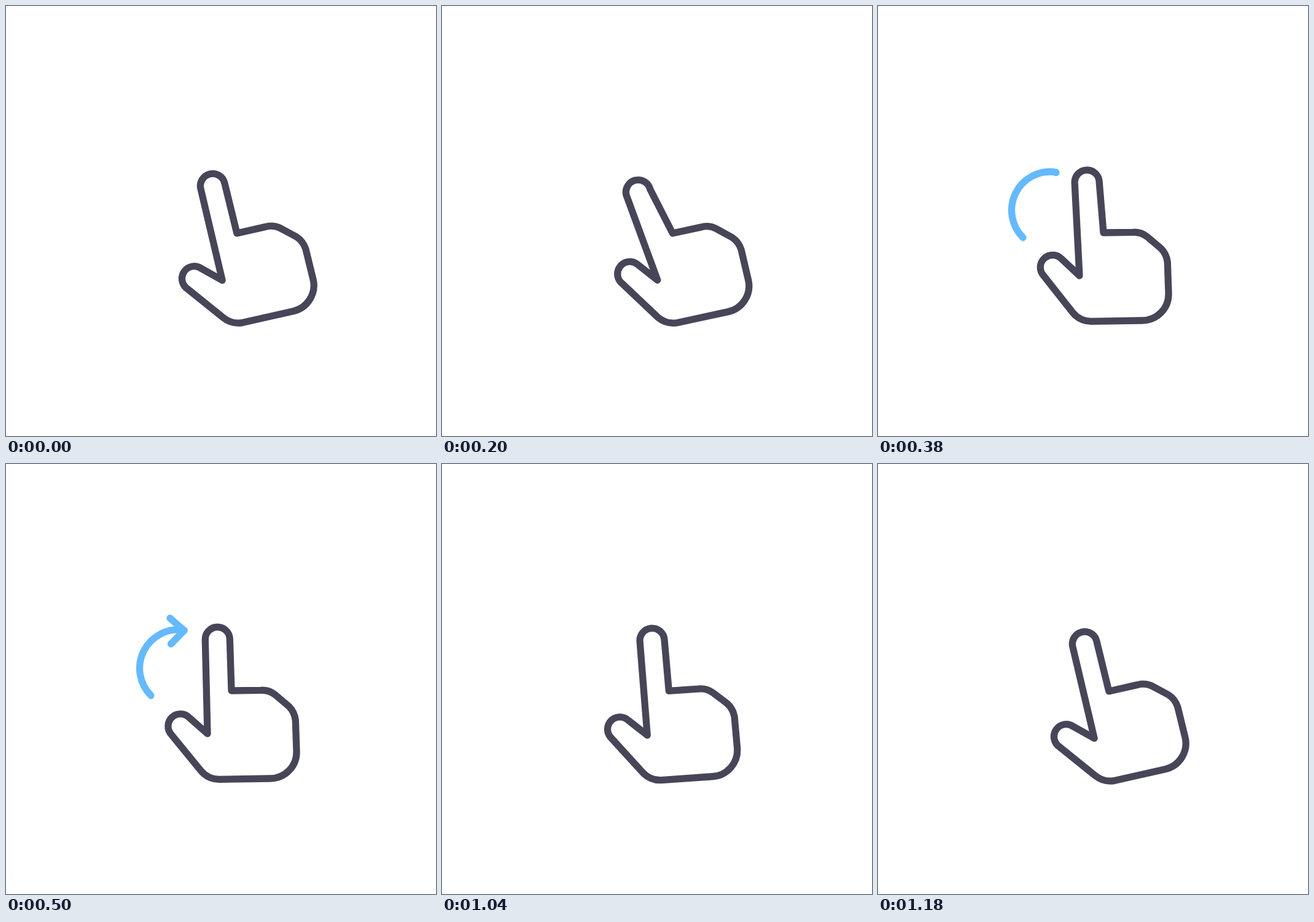
An HTML page for the animation above (1200 ms loop, 700 by 700 pixels).

```html
<!DOCTYPE html>
<html>
<head>
<meta charset="utf-8">
<style>
html, body { margin: 0; height: 100%; overflow: hidden; background: #fff; }
svg { display: block; width: 100vw; height: 100vh; }
path { fill: none; stroke-width: 11.3; stroke-linecap: round; stroke-linejoin: round; }
#hand { stroke: #474658; }
#arc, #head { stroke: #64b9ff; }
</style>
</head>
<body>
<svg viewBox="0 0 700 700">
  <path id="arc" pathLength="1" d="M236 377A62.8 62.8 0 0 1 290 270.5"/>
  <path id="head"/>
  <path id="hand"/>
</svg>
<script>
const LOOP = 1200;
const [arc, head, hand] = ['arc', 'head', 'hand'].map(id => document.getElementById(id));

// Smooth progress from 0 to 1 between two times
const ease = (t, from, to) => {
  const p = Math.min(1, Math.max(0, (t - from) / (to - from)));
  return p * p * (3 - 2 * p);
};

// The fingertip and thumb lag behind the palm by the bend amount
function handPath(bend) {
  const tip = (x, y) => `${x - 20.5 * bend} ${y + 7.5 * bend}`;
  const thumb = (x, y) => `${x + 2 * bend} ${y - 7 * bend}`;
  return `M328 439L${thumb(298.4, 413.1)}A20 20 0 0 0 ${thumb(269.4, 440.7)}
    L317 499A39 39 0 0 0 346.7 513.3L430 512A43 43 0 0 0 473 468
    L471.3 417A38 38 0 0 0 460.5 394.5L438 375.5A34 34 0 0 0 415 368.3L367 369
    L${tip(364.3, 285)}A20 20 0 0 0 ${tip(324.3, 286)}Z`;
}

function drawArrow(t) {
  const start = ease(t, 900, 1020), end = ease(t, 220, 395);
  const shown = end > start;
  arc.style.display = shown ? '' : 'none';
  arc.setAttribute('stroke-dasharray', `${end - start} 9`);
  arc.setAttribute('stroke-dashoffset', -start);

  const size = ease(t, 370, 500) * (1 - ease(t, 960, 1030));
  head.style.display = size > 0 ? '' : 'none';
  head.setAttribute('d', `M${290 - 23 * size} ${271 - 20 * size}L290 271L${290 - 21.5 * size} ${271 + 22 * size}`);
}

function draw(t) {
  const bend = ease(t, 100, 220) - ease(t, 260, 430);
  const turn = 1 - ease(t, 175, 362) + ease(t, 970, 1180);
  hand.setAttribute('d', handPath(bend));
  hand.setAttribute('transform', `rotate(${-11.9 * turn} 376 327)`);
  drawArrow(t);
}

const begin = performance.now();
function tick() {
  draw((performance.now() - begin) % LOOP);
  requestAnimationFrame(tick);
}
tick();
</script>
</body>
</html>
```
